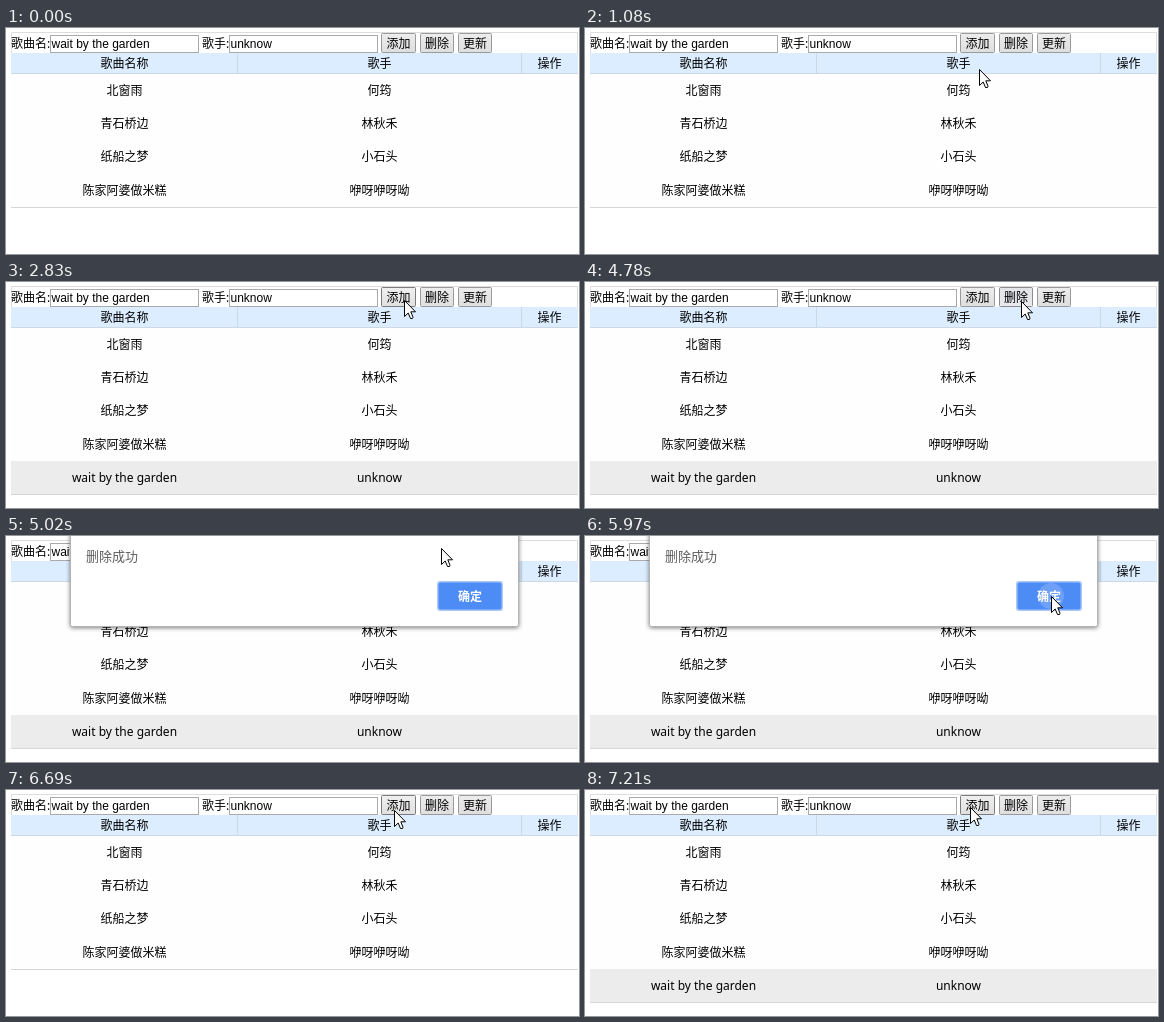
An HTML page for the animation above (7990 ms loop, 573 by 226 pixels).

```html
<!DOCTYPE html>
<html lang="zh-CN">
<head>
<meta charset="utf-8">
<title>歌曲列表</title>
<style>
  html, body { margin: 0; width: 100%; height: 100%; overflow: hidden; background: #fff; }
  svg { display: block; width: 573px; height: 226px; }
  text { font: 12px "Noto Sans", "Noto Sans CJK SC", "Noto Sans CJK", sans-serif; fill: #000; white-space: pre; }
  .mid { text-anchor: middle; }
  .field { font-family: "Liberation Sans", Arial, sans-serif; }
  .button rect { fill: url(#idle); stroke: #9a9a9a; }
  .button.hover rect { fill: url(#hover); stroke: #7c7c7c; }
  .button.down rect { fill: url(#down); stroke: #8c8c8c; }
  #dialog .panel { fill: #fff; stroke: #b4b4b4; filter: drop-shadow(0 1px 2px rgba(0, 0, 0, .5)); }
  #dialog .message { font-size: 13px; fill: #5f5f5f; }
  #dialog .ok { font-weight: bold; fill: #fff; }
</style>
</head>
<body>
<svg viewBox="0 0 573 226" xmlns="http://www.w3.org/2000/svg">
  <defs>
    <linearGradient id="idle" x2="0" y2="1"><stop stop-color="#ededed"/><stop offset="1" stop-color="#dedede"/></linearGradient>
    <linearGradient id="hover" x2="0" y2="1"><stop stop-color="#f0f0f0"/><stop offset="1" stop-color="#e0e0e0"/></linearGradient>
    <linearGradient id="down" x2="0" y2="1"><stop stop-color="#e2e4e8"/><stop offset="1" stop-color="#e8eaee"/></linearGradient>
  </defs>
  <g id="page"></g>
  <g id="dialog">
    <rect class="panel" x="64.5" y="-9.5" width="448" height="100" rx="2"/>
    <text class="message" x="80" y="25">删除成功</text>
    <rect x="431" y="45" width="66" height="30" rx="3" fill="#a9c8fa"/>
    <rect x="432.5" y="46.5" width="63" height="27" rx="2" fill="#4d8bf5"/>
    <circle id="ripple" cx="466" cy="60" fill="#fff" opacity=".18"/>
    <text class="ok mid" x="464" y="65">确定</text>
  </g>
  <g id="cursor">
    <path id="arrow" d="M.5 .5V16.5L4.2 13 6.5 18.5H8.5L9 17.2 6.8 11.8H11.5Z" fill="#fff" stroke="#000"/>
    <path id="beam" d="M0 .5H3M4 .5H7M0 15.5H3M4 15.5H7M3.5 1V15" fill="none" stroke="#000"/>
  </g>
</svg>
<script>
const LOOP = 7990;
const TITLE = "wait by the garden";
const SINGER = "unknow";
const songs = [
  ["北窗雨", "何筠"],
  ["青石桥边", "林秋禾"],
  ["纸船之梦", "小石头"],
  ["陈家阿婆做米糕", "咿呀咿呀呦"],
  [TITLE, SINGER],
];
const tops = [46, 79, 112, 146, 179, 212];
const centers = [118.5, 373.5, 543.5];
const LINE = "#ccd8e6";

// Each step changes only the properties it names.
const steps = [
  [0, { at: null, row: -1, hover: -1, down: -1, count: 4, dialog: 0, ripple: 0, beam: false }],
  [810, { at: [392, 187] }],
  [930, { at: [393, 90], row: 1 }],
  [1080, { at: [394, 41], row: -1 }],
  [1200, { at: [398, 30] }],
  [1320, { at: [402, 23] }],
  [1470, { at: [402, 20], hover: 0 }],
  [1750, { at: [401, 17] }],
  [1870, { at: [400, 15] }],
  [2270, { at: [398, 18] }],
  [2550, { down: 0 }],
  [2830, { down: -1, count: 5 }],
  [3920, { at: [421, 19], hover: 1 }],
  [4040, { at: [435, 19] }],
  [4200, { at: [436, 19] }],
  [4780, { down: 1 }],
  [4900, { dialog: .6 }],
  [5020, { dialog: 1, at: [435, 12], down: -1, hover: -1 }],
  [5550, { at: [439, 18], beam: true }],
  [5700, { at: [465, 58], beam: false }],
  [5850, { at: [466, 60], ripple: 7 }],
  [5970, { ripple: 13 }],
  [6120, { dialog: .5 }],
  [6240, { dialog: 0, ripple: 0, at: [466, 61], count: 4, row: 0 }],
  [6390, { at: [451, 57] }],
  [6540, { at: [397, 32], row: -1 }],
  [6690, { at: [388, 20], hover: 0 }],
  [6810, { at: [385, 17] }],
  [7060, { down: 0 }],
  [7210, { down: -1, count: 5 }],
];

const $ = id => document.getElementById(id);
const page = $("page");

function add(tag, attrs, parent = page, content = "") {
  const node = document.createElementNS("http://www.w3.org/2000/svg", tag);
  for (const key in attrs) node.setAttribute(key, attrs[key]);
  node.textContent = content;
  parent.appendChild(node);
  return node;
}
const box = (x, y, width, height, fill, parent) => add("rect", { x, y, width, height, fill }, parent);
const label = (x, y, content, cls = "", parent) => add("text", { x, y, class: cls }, parent, content);

function field(x, value) {
  add("rect", { x: x + .5, y: 7.5, width: 148, height: 17, fill: "#fff", stroke: "#aaa" });
  label(x + 1.5, 20, value, "field");
}

function button(x, width, name) {
  const group = add("g", { class: "button" });
  add("rect", { x: x + .5, y: 5.5, width: width - 1, height: 19, rx: 1 }, group);
  label(x + width / 2, 20, name, "mid", group);
  return group;
}

add("path", { d: "M5.5 25V4.5H571.5V25", fill: "none", stroke: "#ddd" });
label(5, 20, "歌曲名:");
field(44, TITLE);
label(196, 20, "歌手:");
field(223, SINGER);
const buttons = [button(375, 35, "添加"), button(414, 34, "删除"), button(452, 34, "更新")];

box(5, 25, 567, 21, "#dbedff");
box(5, 45, 567, 1, LINE);
box(231, 25, 1, 21, LINE);
box(515, 25, 1, 21, LINE);
["歌曲名称", "歌手", "操作"].forEach((name, i) => label(centers[i], 40, name, "mid"));

const rows = songs.map((song, i) => {
  const group = add("g", {});
  const back = box(5, tops[i], 567, tops[i + 1] - tops[i], "#fefefe", group);
  song.forEach((name, j) => label(centers[j], tops[i] + 21, name, "mid", group));
  return { group, back };
});
const edge = box(5, 179, 567, 1, "#d6d6d6");

function stateAt(time) {
  const state = {};
  for (const [start, change] of steps) {
    if (start > time) break;
    Object.assign(state, change);
  }
  return state;
}

function show(node, visible) {
  node.style.display = visible ? "" : "none";
}

function draw(s) {
  rows.forEach(({ group, back }, i) => {
    show(group, i < s.count);
    back.setAttribute("fill", i === s.row || i === 4 ? "#ececec" : "#fefefe");
  });
  edge.setAttribute("y", tops[s.count]);
  buttons.forEach((b, i) => {
    b.setAttribute("class", "button" + (i === s.down ? " down" : i === s.hover ? " hover" : ""));
  });
  show($("dialog"), s.dialog > 0);
  $("dialog").setAttribute("opacity", s.dialog);
  $("ripple").setAttribute("r", s.ripple);
  show($("cursor"), s.at);
  if (s.at) $("cursor").setAttribute("transform", `translate(${s.at})`);
  show($("arrow"), !s.beam);
  show($("beam"), s.beam);
}

const begin = performance.now();
function tick() {
  draw(stateAt((performance.now() - begin) % LOOP));
  requestAnimationFrame(tick);
}
tick();
</script>
</body>
</html>
```
